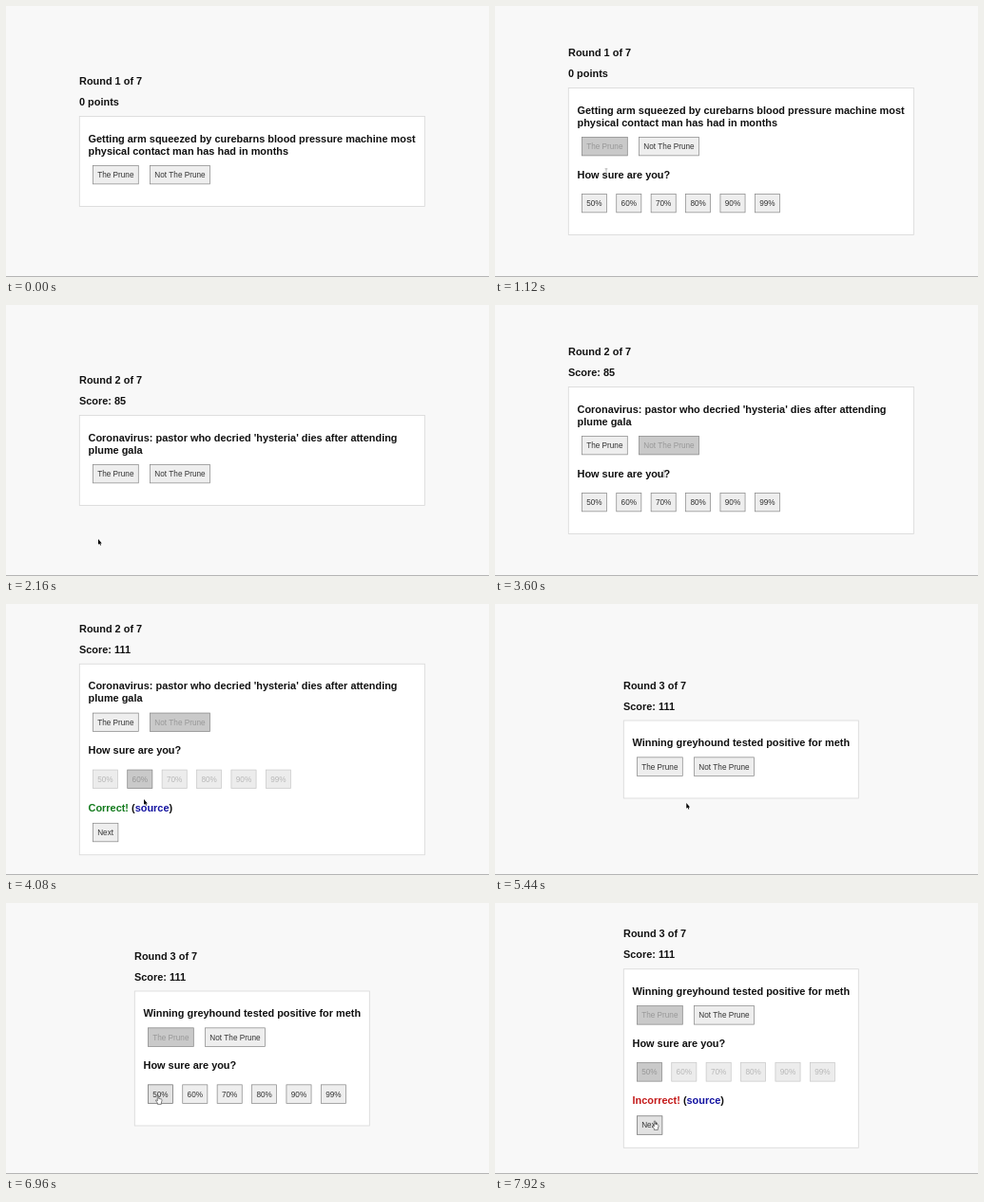
Recreate the animation shown at these times as an HTML page with a canvas. Size 508x286 px, loop 8000 ms.

```html
<!DOCTYPE html>
<html lang="en">
<head>
<meta charset="utf-8">
<title>Headline quiz</title>
<style>
  html, body { margin: 0; width: 100%; height: 100%; overflow: hidden; background: #f8f8f8; }
  canvas { display: block; width: 100vw; height: 100vh; }
</style>
</head>
<body>
<canvas id="stage"></canvas>
<script>
const W = 508, H = 286, LOOP = 8000, STEP = 80;
const canvas = document.getElementById('stage');
const ctx = canvas.getContext('2d');
const dpr = window.devicePixelRatio || 1;
canvas.width = W * dpr;
canvas.height = H * dpr;

const FACE = '"Liberation Sans", Arial, sans-serif';
const BOLD = `bold 10.93px ${FACE}`;
const PLAIN = `8.2px ${FACE}`;
const INK = '#111';
const LINE = 13, ROW = 20.2;
const ANSWERS = ['The Prune', 'Not The Prune'];

// Each round: when its clicks happen, and where the pointer idles and clicks.
const ROUNDS = [
  { start: 0, answered: 1040, rated: 1600, next: 2080, left: 77.3, width: 363.2,
    lines: ['Getting arm squeezed by curebarns blood pressure machine most',
            'physical contact man has had in months'],
    before: '0 points', after: 'Score: 85', answer: 0, level: 4, correct: true,
    idle: { x: 236, y: 226 }, pick: { x: 117, y: 175 },
    rate: { x: 250, y: 207 }, leave: { x: 97, y: 247 } },
  { start: 2080, answered: 3520, rated: 4080, next: 4640, left: 77.3, width: 363.2,
    lines: ["Coronavirus: pastor who decried 'hysteria' dies after attending",
            'plume gala'],
    before: 'Score: 85', after: 'Score: 111', answer: 1, level: 1, correct: true,
    idle: { x: 150, y: 204 }, pick: { x: 178, y: 178 },
    rate: { x: 145, y: 206 }, leave: { x: 103, y: 241 } },
  { start: 4640, answered: 6560, rated: 7040, next: LOOP, left: 135.3, width: 247,
    lines: ['Winning greyhound tested positive for meth'],
    before: 'Score: 111', after: 'Score: 111', answer: 0, level: 0, correct: false,
    idle: { x: 201.3, y: 210 }, pick: { x: 194, y: 172 },
    rate: { x: 160, y: 203 }, leave: { x: 168, y: 230 } }
];

// The pointer arrives one step before each click and then waits.
const GLIDE = 320, APPEAR = 240;
const stops = ROUNDS.flatMap(r => [
  { at: r.start + 400, ...r.idle },
  { at: r.answered - STEP, ...r.pick },
  { at: r.rated - STEP, ...r.rate },
  { at: r.next - STEP, ...r.leave }
]);

function pointerAt(t) {
  if (t < APPEAR) return null;
  let { x, y } = { x: 300, y: 252 };
  for (const s of stops) {
    const u = Math.min(1, Math.max(0, (t - s.at + GLIDE) / GLIDE));
    const e = 1 - (1 - u) ** 3;
    x += (s.x - x) * e;
    y += (s.y - y) * e;
  }
  return { x, y };
}

let pointer, shape;

function hits(x, y, w, h) {
  return pointer && pointer.x >= x && pointer.x <= x + w && pointer.y >= y && pointer.y <= y + h;
}

function heading(str, x, y, color = INK, over = 'beam') {
  ctx.font = BOLD;
  ctx.fillStyle = color;
  ctx.fillText(str, x, y);
  const w = ctx.measureText(str).width;
  if (hits(x, y - 10, w, LINE)) shape = over;
  return x + w;
}

const LOOKS = {
  normal: ['#eeeeee', '#888888', '#333333'],
  hover: ['#e2e2e2', '#707070', '#333333'],
  chosen: ['#c9c9c9', '#8c8c8c', '#989898'],
  off: ['#ececec', '#cacaca', '#b8b8b8']
};

// Draws a button as wide as its label plus padding, returns its right edge.
function button(label, x, y, look = 'normal') {
  ctx.font = PLAIN;
  const w = ctx.measureText(label).width + 10.4;
  if (look === 'normal' && hits(x, y, w, ROW)) {
    look = 'hover';
    shape = 'hand';
  }
  const [fill, edge, ink] = LOOKS[look];
  ctx.fillStyle = fill;
  ctx.fillRect(x, y, w, ROW);
  ctx.strokeStyle = edge;
  ctx.lineWidth = 0.7;
  ctx.strokeRect(x + 0.35, y + 0.35, w - 0.7, ROW - 0.7);
  ctx.fillStyle = ink;
  ctx.fillText(label, x + 5.2, y + 13);
  return x + w;
}

function drawRound(r, index, t) {
  const stage = t >= r.rated ? 2 : t >= r.answered ? 1 : 0;
  const extra = (r.lines.length - 1) * LINE;
  const height = [82, 142, 188.5][stage] + extra;
  const top = 164 - height / 2;
  const inner = r.left + 9.2, indent = r.left + 13.7;

  heading(`Round ${index + 1} of 7`, r.left - 0.3, top - 33.5);
  heading(stage === 2 ? r.after : r.before, r.left - 0.3, top - 11.5);

  ctx.fillStyle = '#fff';
  ctx.fillRect(r.left, top, r.width, height);
  ctx.strokeStyle = '#d8d8d8';
  ctx.lineWidth = 0.8;
  ctx.strokeRect(r.left, top, r.width, height);

  r.lines.forEach((line, i) => heading(line, inner, top + 27.1 + i * LINE));

  const y = top + extra;
  let x = indent;
  ANSWERS.forEach((label, i) => {
    x = button(label, x, y + 38.5, stage && i === r.answer ? 'chosen' : 'normal') + 11.5;
  });
  if (!stage) return;

  heading('How sure are you?', inner, y + 82);
  for (let i = 0; i < 6; i++) {
    const look = stage === 1 ? 'normal' : i === r.level ? 'chosen' : 'off';
    button(`${Math.min(50 + i * 10, 99)}%`, indent + i * 36.4, y + 98.5, look);
  }
  if (stage === 1) return;

  const base = y + 142.7;
  x = r.correct ? heading('Correct! ', inner, base, '#127a1c')
                : heading('Incorrect! ', inner, base, '#c41a1a');
  x = heading('(', x, base);
  x = heading('source', x, base, '#1212a0', 'hand');
  heading(')', x, base);
  button('Next', indent, y + 154.7);
}

const ARROW = new Path2D('M0 0V5.8L1.3 4.7L2.2 6.7L3 6.3L2.2 4.4H3.8Z');
const HAND = new Path2D('M-.7 .3Q0-.6 .7 .3V3.4L3.4 4Q4.2 4.3 4 5.4L3.3 8.2V9.4H-.6V8.2L-2.4 5.6Q-2.5 4.6-1.6 4.9L-.7 5.8Z');
const BEAM = new Path2D('M-1.4-3.2H1.4M0-3.2V3.2M-1.4 3.2H1.4');

function outline(path, color, width) {
  ctx.strokeStyle = color;
  ctx.lineWidth = width;
  ctx.stroke(path);
}

function drawPointer() {
  ctx.save();
  ctx.translate(pointer.x, pointer.y);
  ctx.lineJoin = 'round';
  if (shape === 'arrow') {
    outline(ARROW, '#fff', 0.8);
    ctx.fillStyle = '#000';
    ctx.fill(ARROW);
  } else if (shape === 'hand') {
    ctx.fillStyle = '#fff';
    ctx.fill(HAND);
    outline(HAND, '#333', 0.6);
  } else {
    outline(BEAM, '#777', 0.5);
  }
  ctx.restore();
}

function draw(now) {
  const t = Math.floor((now % LOOP) / STEP) * STEP;
  ctx.setTransform(dpr, 0, 0, dpr, 0, 0);
  ctx.fillStyle = '#f8f8f8';
  ctx.fillRect(0, 0, W, H);
  ctx.fillStyle = '#b4b4b4';
  ctx.fillRect(0, H - 1, W, 1);

  pointer = pointerAt(t);
  shape = 'arrow';
  const index = ROUNDS.findLastIndex(r => t >= r.start);
  drawRound(ROUNDS[index], index, t);
  if (pointer) drawPointer();
}

const begin = performance.now();
function tick() {
  draw(performance.now() - begin);
  requestAnimationFrame(tick);
}
tick();
</script>
</body>
</html>
```
